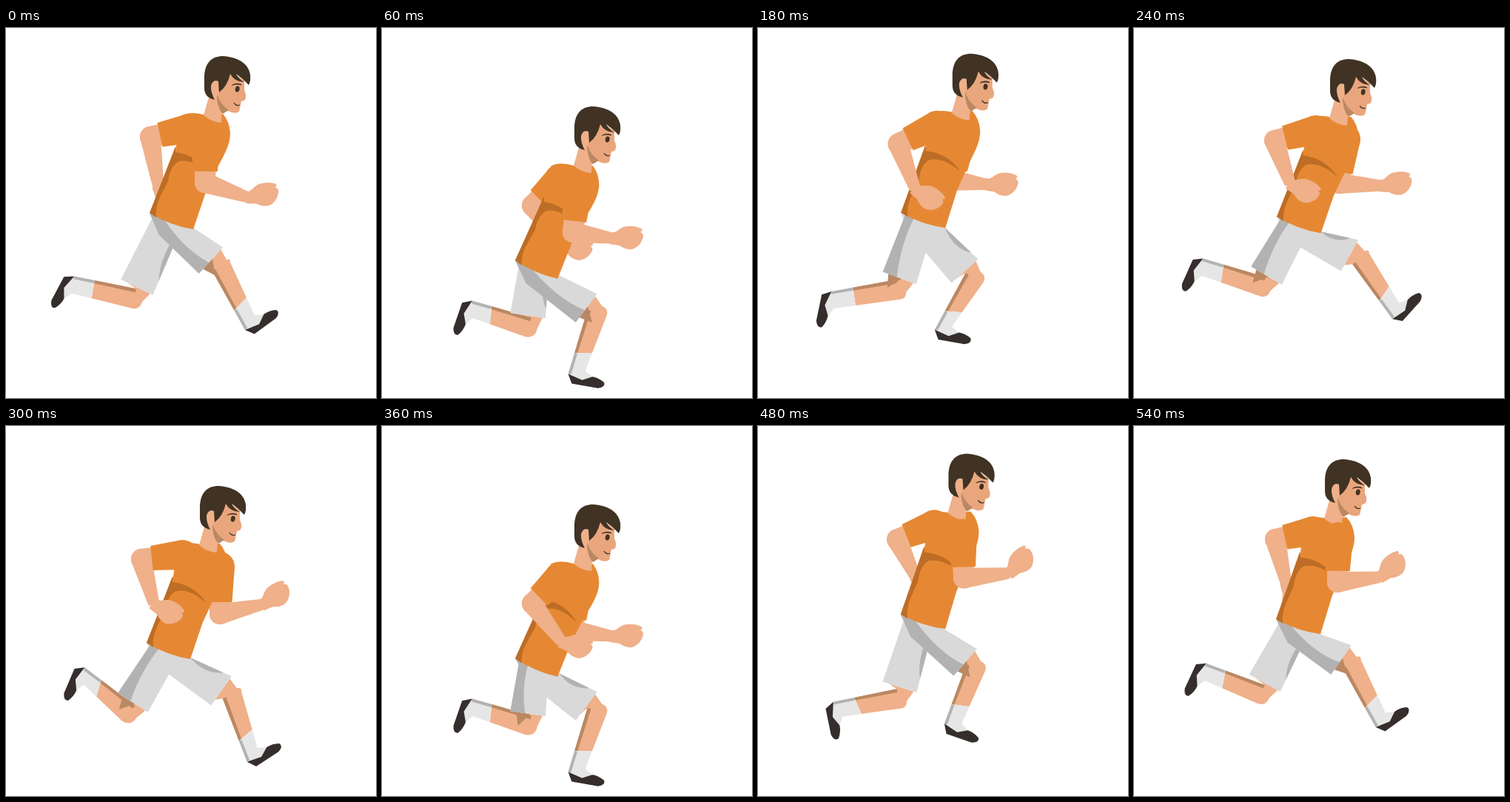
Write an HTML page with a canvas that moves like this. It is 500 px wide and 500 px high and loops after 570 ms.

```html
<!DOCTYPE html>
<html lang="en">
<head>
<meta charset="utf-8">
<title>Runner</title>
<style>
html, body { margin: 0; height: 100%; overflow: hidden; background: #fff; }
canvas { display: block; }
</style>
</head>
<body>
<canvas id="stage" width="500" height="500"></canvas>
<script>
const ctx = document.getElementById('stage').getContext('2d');
const LOOP = 570, STEP = 30;
const times = [0, 60, 120, 240, 300, 360, 420, 540];
const skin = '#efb08a', face = '#e9a67d', skinShade = '#ba8863', shirt = '#e68833', shirtShade = '#bd6d25',
  shorts = '#d9d9d9', shortsShade = '#b2b2b2', sock = '#e6e6e6', shoe = '#352e2c', hair = '#403324';

// head x, y; collar x, y; shirt hem x, y
const body = [
  [268, 38, 267, 118, 194, 250], [260, 53, 259, 133, 191, 268], [265, 42, 267, 122, 193, 255],
  [262, 81, 263, 161, 190, 293], [260, 106, 259, 187, 180, 314], [259, 48, 262, 129, 192, 264],
  [258, 45, 261, 126, 192, 261]];
// shoulder, elbow, wrist, middle of the hand
const nearArm = [
  [270, 148, 269, 209, 327, 229, 347, 226], [240, 152, 198, 190, 226, 246, 243, 258],
  [246, 138, 190, 152, 211, 211, 230, 220], [239, 174, 183, 180, 200, 241, 220, 252],
  [240, 204, 203, 240, 243, 292, 264, 298], [270, 158, 269, 214, 331, 220, 349, 206],
  [276, 150, 275, 211, 333, 204, 350, 190]];
const farArm = [
  [247, 136, 195, 147, 206, 215, 215, 232], [262, 165, 245, 222, 281, 234, 300, 236],
  [286, 150, 277, 210, 334, 213, 353, 211], [289, 190, 289, 254, 347, 241, 363, 231],
  [265, 215, 258, 276, 311, 284, 330, 284], [240, 145, 196, 178, 232, 216, 250, 222],
  [242, 142, 191, 153, 206, 214, 214, 232]];
// knee x, y; shin angle, shin length, foot angle
const nearLeg = [
  [290, 322, 69, 92, -36], [215, 375, 149, 90, 78], [174, 349, 205, 89, 114], [166, 388, 226, 86, 113],
  [198, 404, 205, 84, 109], [279, 350, 171, 82, 76], [294, 322, 69, 91, -36]];
const farLeg = [
  [173, 365, 200, 86, 118], [266, 385, 196, 84, 76], [306, 312, 62, 92, -48], [305, 364, 77, 92, -33],
  [290, 385, 115, 91, 10], [218, 384, 141, 91, 40], [172, 362, 209, 85, 115]];

// Both footfalls share one pose with the sides exchanged.
function mirrorFootfall(a, b) {
  const [pa, pb] = [a[4], b[4]];
  a.splice(1, 0, pb);
  if (a !== b) b.splice(1, 0, pa);
}
mirrorFootfall(body, body);
mirrorFootfall(nearArm, farArm);
mirrorFootfall(nearLeg, farLeg);

// Cyclic cubic interpolation through the keys.
function sample(track, t) {
  const n = times.length;
  const at = i => times[(i + n) % n] + Math.floor(i / n) * LOOP;
  const key = i => track[(i + n) % n];
  let i = n - 1;
  while (times[i] > t) i--;
  const span = at(i + 1) - at(i), u = (t - at(i)) / span;
  return key(i).map((a, c) => {
    const b = key(i + 1)[c];
    const m0 = (b - key(i - 1)[c]) / (at(i + 1) - at(i - 1)) * span;
    const m1 = (key(i + 2)[c] - a) / (at(i + 2) - at(i)) * span;
    return a + u * (m0 + u * (3 * (b - a) - 2 * m0 - m1 + u * (2 * (a - b) + m0 + m1)));
  });
}

const rad = deg => deg * Math.PI / 180;
const move = (p, v, k) => [p[0] + v[0] * k, p[1] + v[1] * k];
const mix = (p, q, k) => [p[0] + (q[0] - p[0]) * k, p[1] + (q[1] - p[1]) * k];
const unit = (p, q) => {
  const d = Math.hypot(q[0] - p[0], q[1] - p[1]) || 1;
  return [(q[0] - p[0]) / d, (q[1] - p[1]) / d];
};
const frontOf = v => [v[1], -v[0]];

// Points of four numbers are quadratic curves: control, end.
function shape(color, ...points) {
  ctx.beginPath();
  for (const p of points) p.length > 2 ? ctx.quadraticCurveTo(...p) : ctx.lineTo(...p);
  ctx.fillStyle = color;
  ctx.fill();
}
function paint(color, d) {
  ctx.fillStyle = color;
  ctx.fill(new Path2D(d));
}
function placed(x, y, angle, draw, scale = 1) {
  ctx.save();
  ctx.translate(x, y);
  ctx.rotate(angle);
  ctx.scale(scale, scale);
  draw();
  ctx.restore();
}
function bone(color, a, b, ra, rb) {
  const n = frontOf(unit(a, b));
  shape(color, move(a, n, ra), move(b, n, rb), move(b, n, -rb), move(a, n, -ra));
  ctx.beginPath();
  ctx.arc(a[0], a[1], ra, 0, 7);
  ctx.fill();
}

function drawArm([sx, sy, ex, ey, wx, wy, hx, hy]) {
  const shoulder = [sx, sy], elbow = [ex, ey];
  bone(skin, elbow, shoulder, 14, 15);
  bone(skin, elbow, [wx, wy], 14, 7.5);
  placed(wx, wy, Math.atan2(hy - wy, hx - wx), () => paint(skin,
    'M-3-8L3-8C9-10 12-16 21-16Q31-17 39-13Q43-11 38-8Q42-7 42-3C41 6 34 13 27 15Q18 16 10 10L-3 8Z'));
  bone(shirt, shoulder, mix(shoulder, elbow, .75), 20, 16.5);
}

function drawLeg([kx, ky, shinAngle, shinLength, footAngle], hem, near) {
  const knee = [kx, ky], hip = [hem[0] + 29.5, hem[1] + 11];
  const dir = unit(hip, knee), n = frontOf(dir);
  const mid = move(knee, dir, -15), back = move(mid, n, -27), front = move(mid, n, 21);
  const a = rad(shinAngle), f = rad(footAngle);
  const heel = [kx + shinLength * Math.cos(a), ky + shinLength * Math.sin(a)];
  const onFoot = (x, y) => [heel[0] + x * Math.cos(f) - y * Math.sin(f), heel[1] + x * Math.sin(f) + y * Math.cos(f)];
  const instep = onFoot(22, -8), shin = unit(knee, onFoot(11, -4)), sn = frontOf(shin);
  const kneeBack = move(knee, sn, -13), kneeFront = move(knee, sn, 14);
  const sockBack = mix(kneeBack, heel, .67), sockFront = mix(kneeFront, instep, .67);
  const cap = move(knee, unit([0, 0], [n[0] + sn[0], n[1] + sn[1]]), 18);

  shape(skin, move(mid, n, 17), move(knee, n, 12), [...cap, ...kneeFront], sockFront, sockBack, kneeBack, move(mid, n, -18));
  shape(skinShade, kneeBack, sockBack, move(sockBack, sn, 4), move(kneeBack, sn, 5));
  if (near) shape(skinShade, move(mid, n, -19), move(move(mid, n, -14), dir, 18), mid);
  shape(sock, sockBack, sockFront, instep, onFoot(33, -2), onFoot(20, 6), heel);
  shape(shortsShade, sockBack, heel, onFoot(4, 0), move(sockBack, sn, 4));
  placed(...heel, f, () => paint(shoe, 'M0 0L7 12L43 12Q53 9 50 3Q42-2 33-2L20 5Z'));

  const hipBack = move(hip, n, -25);
  const hipFront = dir[0] > 0 ? [hem[0] + 59, hem[1] + 20] : move(hip, n, 16);
  shape(shorts, hem, hipBack, back, front, hipFront);
  if (near) {
    const bend = move(mix(hip, mid, .5), n, -17);
    shape(shortsShade, hem, hipBack, back, mix(back, front, .42), [...bend, hem[0] + 18, hem[1] + 6]);
  } else {
    const end = mix(hipFront, front, .8);
    shape(shortsShade, hipFront, end, [...move(mix(hipFront, end, .6), n, -13), ...hipFront]);
  }
}

function drawTorso(cx, cy, hx, hy) {
  const turn = Math.atan2(hy - cy, hx - cx) - Math.atan2(132, -73);
  placed(cx, cy, turn, () => {
    ctx.translate(-267, -118);
    paint(shirt, 'M267 117Q248 112 236 119L230 160L194 250Q222 267 253 272L270 222L287 186' +
      'C297 168 303 156 303 142Q302 126 293 116L267 117Z');
    paint(shirtShade, 'M229 160L229 168Q260 172 275 197Q254 177 234 180Q222 186 219 207' +
      'C206 232 202 240 203 256L194 250Z');
  }, Math.hypot(hx - cx, hy - cy) / Math.hypot(73, 132));
}

function drawHead(x, y) {
  placed(x - 268, y - 38, 0, () => {
    paint(skin, 'M275 90L267 118Q277 127 291 128L292 113L300 112L290 85Z');
    paint(face, 'M280 85L290 68L304 58L322 71L322 84Q326 92 323 97Q321 99 318 99L317 104Q316 109 315 113' +
      'Q309 117 300 112Q289 107 284 95Z');
    paint(skinShade, 'M285 88Q288 102 301 111L293 116Q285 108 285 88Z');
    paint(skin, 'M288 72Q279 69 277 79Q277 92 284 95Q288 88 288 72Z');
    paint(hair, 'M282 97Q268 94 268 81L268 68C268 46 279 38 293 38C313 39 328 48 330 63Q331 72 328 77' +
      'Q321 69 311 62Q314 69 322 73Q309 73 303 62Q299 79 288 87L287 72Q279 69 277 79Q277 88 282 97Z');
    paint(hair, 'M305 77Q311 73 318 76L318 77.5Q311 75.5 305 78Z');
    ctx.beginPath();
    ctx.ellipse(312.7, 82.5, 2.9, 4, .2, 0, 7);
    ctx.fill();
    ctx.strokeStyle = hair;
    ctx.lineWidth = 1.2;
    ctx.stroke(new Path2D('M308 101Q311 106 316 104'));
  });
}

function drawRunner(t) {
  const [headX, headY, cx, cy, hx, hy] = sample(body, t), hem = [hx, hy];
  const air = ((t % 300) - 120) / 120;
  const lift = air > 0 && air < 1 ? 5 * Math.sin(Math.PI * air) : 0;
  ctx.fillStyle = '#fff';
  ctx.fillRect(0, 0, 500, 500);
  placed(0, -lift, 0, () => {
    drawArm(sample(farArm, t));
    drawLeg(sample(farLeg, t), hem, false);
    drawLeg(sample(nearLeg, t), hem, true);
    drawTorso(cx, cy, hx, hy);
    drawHead(headX, headY);
    drawArm(sample(nearArm, t));
  });
}

const start = performance.now();
function tick() {
  const t = (performance.now() - start) % LOOP;
  drawRunner(Math.floor(t / STEP) * STEP);
  requestAnimationFrame(tick);
}
tick();
</script>
</body>
</html>
```
